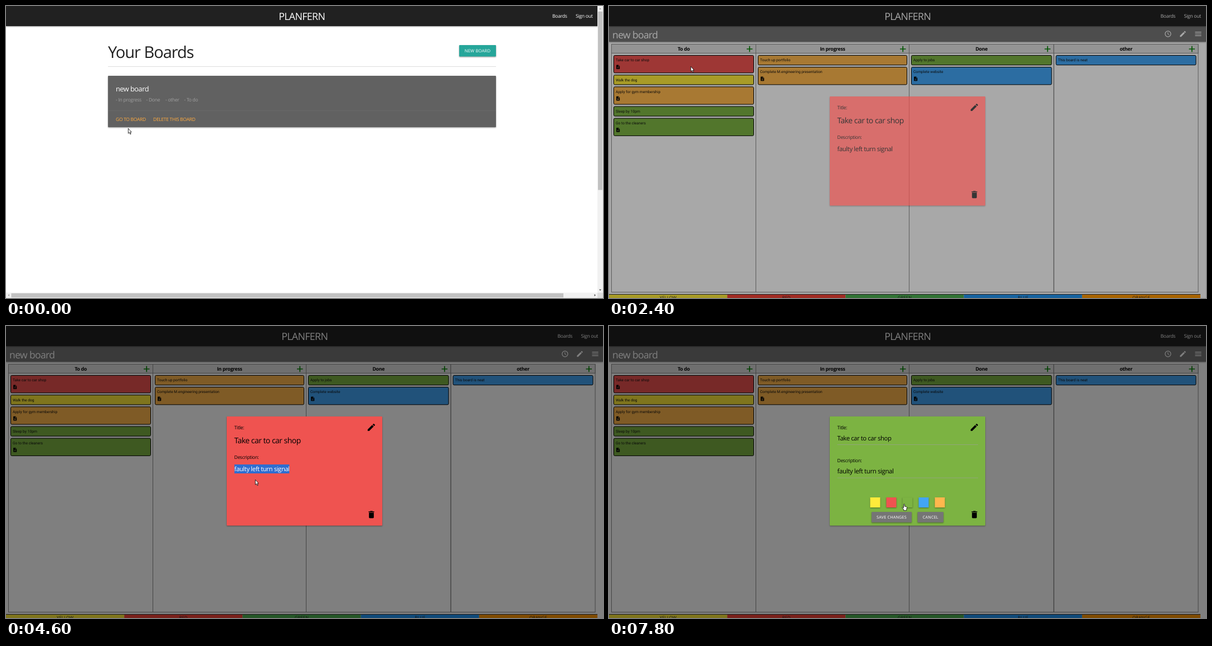
Animation of 1071x523 px, one loop 8000 ms. Source, as an HTML page:

```html
<!DOCTYPE html>
<html lang="en">
<head>
<meta charset="utf-8">
<title>Task board</title>
<style>
  html, body { margin: 0; height: 100%; overflow: hidden; background: #fff; }
  svg { display: block; width: 100vw; height: 100vh; }
  text { font-family: 'Open Sans', 'Noto Sans', sans-serif; letter-spacing: -.035em; white-space: pre; text-rendering: geometricPrecision; }
  .card { font-family: Roboto, sans-serif; letter-spacing: 0; }
  .caps { letter-spacing: .15px; }
  .bold { font-weight: 700; }
  .light { font-weight: 300; }
  .mid { text-anchor: middle; }
  .shade { filter: drop-shadow(0 1px 1px rgba(0, 0, 0, .4)); }
</style>
</head>
<body>
<svg id="stage" viewBox="0 0 1071 523"></svg>
<script>
const RED = '#ef5350', YELLOW = '#ffeb3b', GREEN = '#7cb342', BLUE = '#42a5f5', ORANGE = '#ffb74d';

const ICONS = {
  pencil: 'M3 17.25V21h3.75L17.81 9.94l-3.75-3.75L3 17.25zM20.71 7.04a1 1 0 0 0 0-1.41l-2.34-2.34a1 1 0 0 0-1.41 0l-1.83 1.83 3.75 3.75 1.83-1.83z',
  trash: 'M6 19c0 1.1.9 2 2 2h8c1.1 0 2-.9 2-2V7H6v12zM19 4h-3.5l-1-1h-5l-1 1H5v2h14V4z',
  note: 'M14 2H6c-1.1 0-2 .9-2 2v16c0 1.1.9 2 2 2h12c1.1 0 2-.9 2-2V8l-6-6zm2 16H8v-2h8v2zm0-4H8v-2h8v2zm-3-5V3.5L18.5 9H13z',
  menu: 'M3 18h18v-2H3v2zm0-5h18v-2H3v2zm0-7v2h18V6H3z'
};

const rect = (x, y, w, h, fill, more = '') =>
  `<rect x="${x}" y="${y}" width="${w}" height="${h}" fill="${fill}" ${more}/>`;
const text = (x, y, size, str, fill = '#000', cls = '') =>
  `<text x="${x}" y="${y}" font-size="${size}" fill="${fill}" class="${cls}">${str}</text>`;
const icon = (name, cx, cy, scale, fill = '#000') =>
  `<path d="${ICONS[name]}" fill="${fill}" transform="translate(${cx} ${cy}) scale(${scale}) translate(-12 -12)"/>`;
const path = (d, stroke, width = 1) =>
  `<path d="${d}" fill="none" stroke="${stroke}" stroke-width="${width}"/>`;
const group = (id, body, more = '') => `<g id="${id}" ${more}>${body}</g>`;
const button = (x, y, w, h, fill, size, label) =>
  rect(x, y, w, h, fill, 'rx="1" class="shade"') +
  text(x + w / 2, y + h / 2 + 2.7, size, label, '#fff', 'caps mid');

function homePage() {
  const tags = [[197, '- In progress'], [251.5, '- Done'], [286, '- other'], [319.5, '- To do']];
  return rect(0, 36, 1071, 487, '#fff') +
    text(183, 92.5, 29, 'Your Boards', '#212121') +
    button(813, 70, 66, 20.5, '#26a69a', 7.7, 'NEW BOARD') +
    rect(183, 108, 696, 1, '#ddd') +
    rect(183, 125, 696, 92, '#616161', 'rx="1" class="shade"') +
    rect(183, 187, 696, 1, '#686868') +
    text(197, 153, 12.7, 'new board', '#fff') +
    tags.map(([x, s]) => text(x, 170.5, 8.6, s, '#a0a0a0')).join('') +
    text(197, 205.5, 8.5, 'GO TO BOARD', '#ffab40') +
    text(264, 205.5, 8.5, 'DELETE THIS BOARD', '#ffab40');
}

// Each column: title, left, right, cards as [colour, label, has note]
const COLUMNS = [
  ['To do', 4.5, 263.5, [[RED, 'Take car to car shop', 1], [YELLOW, 'Walk the dog'],
    [ORANGE, 'Apply for gym membership', 1], [GREEN, 'Sleep by 10pm'], [GREEN, 'Go to the cleaners', 1]]],
  ['In progress', 263.5, 538.5, [[ORANGE, 'Touch up portfolio'], [ORANGE, 'Complete M.engineering presentation', 1]]],
  ['Done', 538.5, 798, [[GREEN, 'Apply to jobs'], [BLUE, 'Complete website', 1]]],
  ['other', 798, 1057, [[BLUE, 'This board is neat']]]
];

function column([title, left, right, cards]) {
  let y = 88.5;
  let out = rect(left, 68.5, right - left, 444, 'none', 'stroke="#8a8a8a"') +
    rect(left, 68.5, right - left, 16, '#e0e0e0', 'stroke="#8a8a8a"') +
    text((left + right) / 2, 80, 8.8, title, '#000', 'bold mid') +
    path(`M${right - 16.5} 77h10.5m-5.25-5.25v10.5`, '#008000', 1.7);
  for (const [fill, label, note] of cards) {
    const h = note ? 31.3 : 17.2;
    out += rect(left + 4, y, right - left - 8, h, fill, 'rx="2" stroke="#000"') +
      text(left + 7.5, y + 10.8, 6.7, label, '#111', 'card') +
      (note ? icon('note', left + 11.7, y + 20.8, .38) : '');
    y += h + 3.9;
  }
  return out;
}

function boardPage() {
  const bars = [['YELLOW', YELLOW], ['RED', '#f44336'], ['GREEN', '#4caf50'], ['BLUE', '#2196f3'], ['ORANGE', '#ff9800']];
  return rect(0, 36, 1071, 487, '#fff') +
    COLUMNS.map(column).join('') +
    bars.map(([s, c], i) => rect(i * 212.2, 516, 212.2, 8, c) +
      text(i * 212.2 + 106.1, 525.3, 7.6, s, '#222', 'caps mid')).join('') +
    rect(0, 516, 1061, 1, '#333') +
    rect(0, 36, 1071, 28, '#757575', 'class="shade"') +
    text(6, 57.5, 17.5, 'new board', '#fff') +
    group('tools', '<circle cx="993.3" cy="50" r="5.1" fill="none" stroke="#fff" stroke-width="1.2"/>' +
      path('M993.2 47v3.3l2.4 1.4', '#fff') +
      icon('pencil', 1020, 50, .58, '#fff') + icon('menu', 1047.5, 50, .62, '#fff'));
}

const navBar = () => rect(0, 0, 1071, 36, '#212121', 'class="shade"') +
  group('brand', text(530.7, 25, 17.8, 'PLANFERN', '#fff', 'mid')) +
  group('links', text(980, 21.3, 8.6, 'Boards', '#fff') + text(1022, 21.3, 8.7, 'Sign out', '#fff'));

const tip = (d, fill) => `<path d="${d}z" fill="${fill}"/>`;
const scrollBar = (bottom, thumbEnd) => rect(1061, 0, 10, bottom, '#f1f1f1') +
  rect(1062, 10, 8, thumbEnd - 10, '#c1c1c1') +
  tip('M1064 6h4l-2-2.5', '#a3a3a3') + tip(`M1064 ${bottom - 6}h4l-2 2.5`, '#505050');
const bottomBar = () => rect(0, 513.5, 1061, 9.5, '#f1f1f1') + rect(1061, 513.5, 10, 9.5, '#dcdcdc') +
  rect(9.5, 514.5, 990.5, 7.5, '#c1c1c1') +
  tip('M6 516v4l-2.5-2', '#a3a3a3') + tip('M1055.5 516v4l2.5-2', '#505050');

const note = fill => text(409.5, 260, 11.3, 'faulty left turn signal', fill);

function dialog() {
  const view = text(409.5, 210, 13.9, 'Take car to car shop') + text(409.5, 238, 8.5, 'Description:') + note('#000') +
    '<clipPath id="clip"><rect id="range" x="409.5" y="248" width="99" height="16"/></clipPath>' +
    group('picked', rect(409.5, 248, 99, 16, '#2f6dd0') + note('#fff'), 'clip-path="url(#clip)"');
  const edit = text(409.5, 205, 11.3, 'Take car to car shop') + text(409.5, 244, 8.5, 'Description:') +
    text(409.5, 264, 11.5, 'faulty left turn signal') +
    group('lines', rect(409.5, 212, 252.5, 1, '#9e9e9e') + rect(409.5, 271.5, 252.5, 1, '#9e9e9e')) +
    rect(507.5, 193, 1, 15, '#000', 'id="caret"') +
    [YELLOW, RED, GREEN, BLUE, ORANGE].map((c, i) => rect(468.5 + 29 * i, 307, 18, 18, c, 'class="shade"')).join('') +
    button(471, 333, 72, 18.7, '#757575', 7.3, 'SAVE CHANGES') +
    button(553.5, 333, 46.5, 18.7, '#757575', 7.3, 'CANCEL');
  return rect(396, 162, 279, 195.5, RED, 'id="paper" rx="1" class="shade"') +
    text(409.5, 185, 8.7, 'Title:') + group('view', view) + group('edit', edit) +
    icon('pencil', 655.4, 181.5, .73) + icon('trash', 655.5, 337.8, .72);
}

const pointer = (id, d) => `<path id="${id}" d="${d}z" fill="#fff" stroke="#000" stroke-width=".8" stroke-linejoin="round"/>`;

document.getElementById('stage').innerHTML =
  group('home', homePage()) + group('board', boardPage()) + navBar() +
  group('homeBars', scrollBar(513.5, 329.5) + bottomBar()) + group('boardBar', scrollBar(523, 508)) +
  rect(0, 0, 1071, 523, '#000', 'id="veil"') + group('dialog', dialog()) +
  group('cursor',
    pointer('arrow', 'M.3 .3V9.2L2.3 7.4L3.8 10.7L5.2 10.1L3.8 6.9H6.2') +
    pointer('hand', 'M-1 1C-1 -.2 .8 -.2 .8 1V4.2L4 4.8Q5.3 5.1 5 6.6L4.2 9.6V11.6H-.8V10L-3.4 6.8C-3.8 5.8 -2.7 5.3 -1 7'));

const el = {};
document.querySelectorAll('#stage [id]').forEach(node => el[node.id] = node);
const show = (name, on) => el[name].style.display = on ? '' : 'none';
const shift = (name, x, y = 0) => el[name].setAttribute('transform', `translate(${x} ${y})`);

// Pointer route: time, x, y
const ROUTE = [[0, 219, 219], [600, 219, 211], [1200, 219, 211], [2000, 146.5, 108], [2800, 146.5, 108],
  [4000, 521, 262], [4600, 447, 275], [5200, 608, 318], [6000, 660, 185.5], [6400, 660, 185.5], [7800, 529.5, 318.8]];

function pointerAt(t) {
  const i = Math.max(1, ROUTE.findIndex(p => p[0] >= t));
  const [t0, x0, y0] = ROUTE[i - 1], [t1, x1, y1] = ROUTE[i];
  const u = (t - t0) / (t1 - t0), k = u * u * (3 - 2 * u);
  return [x0 + (x1 - x0) * k, y0 + (y1 - y0) * k];
}

function draw(now) {
  const t = Math.floor(now % 8000 / 200) * 200;
  const onBoard = t >= 800, open = t >= 2400, editing = t >= 6200, green = t >= 7600;
  const fade = t < 2400 ? 0 : t < 2600 ? .68 : 1;
  const [x, y] = pointerAt(t);

  show('home', !onBoard);
  show('homeBars', !onBoard);
  show('board', onBoard);
  show('boardBar', onBoard && !open);
  shift('brand', open ? 5 : 0);
  shift('links', open ? 9.5 : 0);
  shift('tools', open ? 9.5 : 0);
  el.veil.setAttribute('opacity', fade / 2);
  el.dialog.setAttribute('opacity', fade);

  show('view', !editing);
  show('edit', editing);
  show('picked', t >= 4200);
  el.range.setAttribute('x', t < 4400 ? x : 409.5);
  show('caret', !green && t % 1000 < 600);
  el.lines.setAttribute('opacity', t >= 7800 ? .6 : 1);
  el.paper.setAttribute('fill', green ? GREEN : RED);

  const hand = t >= 600 && t <= 1200 || t >= 6000 && t <= 6400 || t >= 7400;
  show('hand', hand);
  show('arrow', !hand);
  shift('cursor', x, y);
  requestAnimationFrame(draw);
}
draw(0);
</script>
</body>
</html>
```
